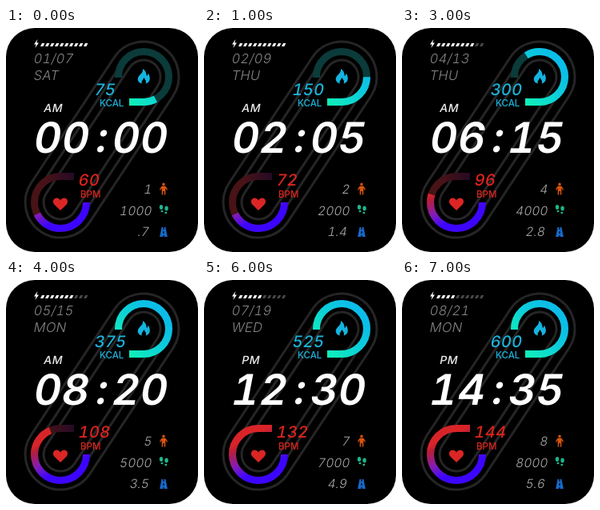
These frames come from a looping animation (240x280 px, 8000 ms). An HTML page:

```html
<!DOCTYPE html>
<html lang="en">
<head>
<meta charset="utf-8">
<title>Watch face</title>
<style>
  html, body { margin: 0; width: 100%; height: 100%; overflow: hidden; background: #fff; }
  svg { display: block; width: 240px; height: 280px; }
  text { font-family: Inter, Roboto, sans-serif; font-variant-numeric: tabular-nums; }
  .time { font-size: 53px; font-weight: 600; fill: #fff; text-anchor: middle; }
  .date { font-size: 16.5px; font-weight: 300; fill: #858585; letter-spacing: .3px; }
  .half { font-size: 14px; font-weight: 500; fill: #eee; letter-spacing: .5px; }
  .value { font-size: 20px; font-weight: 500; letter-spacing: .3px; }
  .unit { font-size: 11.5px; font-weight: 500; }
  .stat { font-size: 15.5px; font-weight: 300; fill: #aaa; text-anchor: end; }
  .cool { fill: #1cb2d9; }
  .warm { fill: #dc231d; }
  .track { fill: none; stroke: #252525; stroke-width: 3; }
  .ring { fill: none; stroke-width: 9; }
</style>
</head>
<body>
<svg viewBox="0 0 240 280">
  <defs>
    <linearGradient id="cool" gradientUnits="userSpaceOnUse" x1="154" y1="92" x2="200" y2="50">
      <stop offset="0" stop-color="#10f0b8"/>
      <stop offset=".6" stop-color="#0cccdc"/>
      <stop offset="1" stop-color="#0bbde8"/>
    </linearGradient>
    <linearGradient id="warm" gradientUnits="userSpaceOnUse" x1="90" y1="180" x2="109" y2="218">
      <stop offset="0" stop-color="#d82428"/>
      <stop offset=".15" stop-color="#b81e38"/>
      <stop offset=".6" stop-color="#821cb8"/>
      <stop offset="1" stop-color="#3c05ff"/>
    </linearGradient>
    <linearGradient id="warmDim" gradientUnits="userSpaceOnUse" x1="50" y1="0" x2="85" y2="0">
      <stop offset="0" stop-color="#471317"/>
      <stop offset="1" stop-color="#260a24"/>
    </linearGradient>
    <path id="coolPath" d="M154 92.5H172A31.5 31.5 0 1 0 140.5 61V62"/>
    <path id="warmPath" d="M100.5 219V218A32.5 32.5 0 1 1 68 185.5H85"/>
  </defs>

  <rect width="240" height="280" rx="36"/>
  <g id="tracks" transform="translate(172 61) rotate(123.5)"></g>

  <use href="#coolPath" class="ring" stroke="#0b3b3a"/>
  <use href="#coolPath" class="ring" stroke="url(#cool)" id="coolRing"/>
  <use href="#warmPath" class="ring" stroke="url(#warmDim)"/>
  <use href="#warmPath" class="ring" stroke="url(#warm)" id="warmRing"/>

  <path fill="#fff" d="M39.5 14L35 20.5H37.6L36.4 25L41 18.5H38.3Z"/>
  <g id="battery"></g>

  <path fill="#14b4e0" d="M171 51C176 54 175 58 176 60C177.200 59 177.500 58 177.500 56.500C181 61 181 68 174.500 69.500C176 66.500 174 64.500 172.300 62C171.500 65 168.500 66.500 170 69.500C163.500 68 163.500 62 167.500 58.500C170 56 171.500 54 171 51Z"/>
  <path fill="#dc2625" d="M68 228L60.500 220.800C57 216.800 60 212.200 63.700 212.600C66 212.900 67.200 214.300 68 215.500C68.800 214.300 70 212.900 72.300 212.600C76 212.200 79 216.800 75.500 220.800Z"/>

  <g fill="#d9530f">
    <circle cx="197" cy="195.200" r="1.700"/>
    <path d="M195 197.500H199L201.500 200.500V203H200.600V201.500L199.300 200.500V208.500H197.800V204H196.200V208.500H194.700V200.500L193.400 201.500V203H192.500V200.500Z"/>
  </g>
  <g fill="#1db68c">
    <ellipse cx="194" cy="224" rx="2.200" ry="3"/>
    <ellipse cx="195" cy="229" rx="1.500" ry="1.200"/>
    <ellipse cx="200.600" cy="225.500" rx="2.200" ry="3"/>
    <ellipse cx="199.800" cy="231" rx="1.500" ry="1.200"/>
  </g>
  <path fill="#1769c9" d="M194.500 249H199.500L201.800 261H192.200Z"/>
  <path stroke="#000" stroke-width="1.200" stroke-dasharray="3 2" d="M197 249V261"/>

  <g id="labels"></g>
</svg>
<script>
  const STEP = 1000, STEPS = 8;
  const DAYS = ['SAT', 'THU', 'SAT', 'THU', 'MON', 'SAT', 'WED', 'MON'];
  const WARM = [88, 113, 141, 180];
  const $ = id => document.getElementById(id);
  const pad = n => String(n).padStart(2, '0');

  function add(parent, tag, attrs) {
    const el = document.createElementNS('http://www.w3.org/2000/svg', tag);
    for (const key in attrs) el.setAttribute(key, attrs[key]);
    return parent.appendChild(el);
  }

  // Slanted text, sheared around the middle of its capital height.
  function label(x, y, cls, cap, text = '', slant = 11) {
    const el = add($('labels'), 'text', {
      class: cls, y: cap / 2,
      transform: `translate(${x} ${y - cap / 2}) skewX(${-slant})`
    });
    el.textContent = text;
    return el;
  }

  for (const r of [44, 32, 21])
    add($('tracks'), 'rect', { class: 'track', x: -r, y: -r, width: 188.3 + 2 * r, height: 2 * r, rx: r });

  const bars = Array.from({ length: 10 }, (_, i) =>
    add($('battery'), 'path', { d: `M${45 + i * 6} 19h3.400l-2 4h-3.400z` }));

  const date = label(35, 43.5, 'date', 12);
  const day = label(35, 64.5, 'date', 12);
  const half = label(47.5, 105, 'half', 10);
  const digits = [53, 88, 151, 186].map(x => label(x, 155.500, 'time', 38.500));
  label(121, 155, 'time', 38.500, ':');
  const kcal = label(111, 84, 'value cool', 14.5);
  label(117, 98, 'unit cool', 8, 'KCAL', 0);
  const bpm = label(91, 197, 'value warm', 14.5);
  label(93, 212, 'unit warm', 8, 'BPM', 0);
  const stand = label(182.5, 207, 'stat', 11);
  const steps = label(182.5, 234, 'stat', 11);
  const km = label(179, 260, 'stat', 11);

  const fill = (ring, length) => ring.setAttribute('stroke-dasharray', `${length} 400`);

  function show(i) {
    date.textContent = pad(i + 1) + '/' + pad(7 + 2 * i);
    day.textContent = DAYS[i];
    half.textContent = i < 6 ? 'AM' : 'PM';
    const clock = pad(2 * i) + pad(5 * i);
    digits.forEach((el, k) => el.textContent = clock[k]);
    kcal.textContent = 75 * (i + 1);
    bpm.textContent = 60 + 12 * i;
    stand.textContent = i + 1;
    steps.textContent = 1000 * (i + 1);
    km.textContent = (0.7 * (i + 1)).toFixed(1).replace(/^0/, '');
    bars.forEach((bar, k) => bar.setAttribute('fill', k < 11 - i ? '#fff' : '#484848'));
    fill($('coolRing'), 33.6 * (i + 1));
    fill($('warmRing'), WARM[i >> 1]);
  }

  let shown = -1;
  function tick() {
    const i = Math.floor(performance.now() / STEP) % STEPS;
    if (i !== shown) show(shown = i);
    requestAnimationFrame(tick);
  }
  tick();
</script>
</body>
</html>
```
